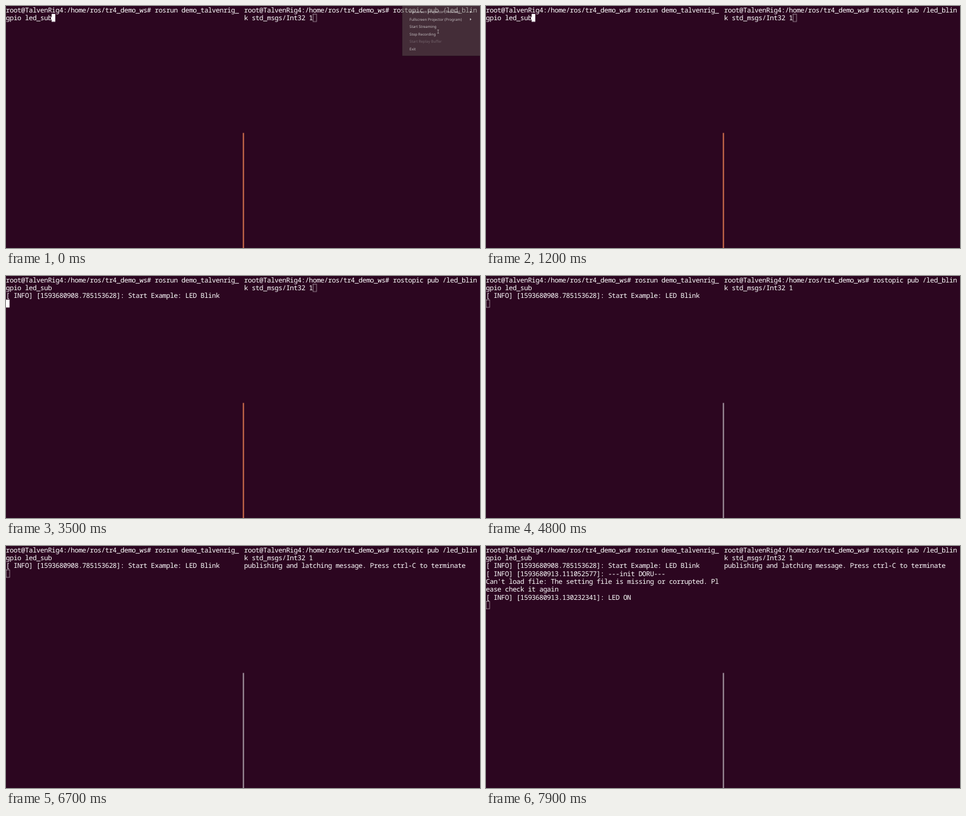
An HTML page that plays this animation: 800 px wide and 409 px high, repeating every 8000 ms.

```html
<!DOCTYPE html>
<html lang="en">
<head>
<meta charset="utf-8">
<title>Two terminals</title>
<style>
  html, body { margin: 0; width: 100%; height: 100%; overflow: hidden; background: #2c0620; }
  svg { display: block; width: 800px; height: 409px; }
  text { white-space: pre; text-rendering: geometricPrecision; }
  .term { font: 11.5px "Noto Sans Mono", monospace; letter-spacing: -.46px; fill: #fff; }
  .menu { font: 6.2px "Noto Sans", sans-serif; fill: #fff; fill-opacity: .68; }
  .menu .off { fill-opacity: .25; }

  /* 8 s loop: 1% = 80 ms */
  .t { animation: 8s step-end infinite; }
  .prompt { animation-name: prompt; }
  .enter { animation-name: enter; }
  .wait { animation-name: wait; }
  .started { animation-name: started; }
  .blur { animation-name: blur; }
  .unfocused { animation-name: unfocused; }
  .typing { animation-name: typing; }
  .sent { animation-name: sent; }
  .latched { animation-name: latched; }
  .published { animation-name: published; }
  .received { animation-name: received; }
  .split { animation-name: split; }
  .menu { animation: fade 8s linear infinite; }

  @keyframes prompt { 0%, 15% { opacity: 1 } 7.5%, 26.25%, to { opacity: 0 } }
  @keyframes enter { 0%, 31.25%, to { opacity: 0 } 28.75% { opacity: 1 } }
  @keyframes wait { 0%, 36.25%, 51.25%, to { opacity: 0 } 31.25%, 43.75% { opacity: 1 } }
  @keyframes started { 0% { opacity: 0 } 31.25%, to { opacity: 1 } }
  @keyframes blur { 0%, 85%, to { opacity: 0 } 52.5% { opacity: 1 } }
  @keyframes unfocused { 0% { opacity: 1 } 52.5%, to { opacity: 0 } }
  @keyframes typing { 0%, 60%, 75%, to { opacity: 0 } 52.5%, 67.5% { opacity: 1 } }
  @keyframes sent { 0%, 82.5%, to { opacity: 0 } 76.25% { opacity: 1 } }
  @keyframes latched { 0%, 83.75%, 98.75%, to { opacity: 0 } 82.5%, 91.25% { opacity: 1 } }
  @keyframes published { 0% { opacity: 0 } 82.5%, to { opacity: 1 } }
  @keyframes received { 0% { opacity: 0 } 85%, to { opacity: 1 } }
  @keyframes split { 0% { fill: #c8694a } 52.5%, to { fill: #9c8d98 } }
  @keyframes fade { 0%, 1.25% { opacity: 1 } 7.5%, to { opacity: 0 } }
</style>
</head>
<body>
<svg viewBox="0 0 800 409">
  <defs>
    <rect id="block" width="6.2" height="13.3" fill="#fff"/>
    <rect id="box" x=".4" y=".5" width="5.9" height="12.5" fill="none" stroke="#b5a8b0" stroke-width=".8"/>
    <path id="arrow" d="M0-2 2.6 0 0 2Z" fill="#fff" fill-opacity=".7"/>
  </defs>
  <rect width="800" height="409" fill="#2c0620"/>
  <rect class="t split" x="399.6" y="214.5" width="2.2" height="194.5"/>

  <g class="term" transform="translate(-.2)">
    <text y="10.7">root@TalvenRig4:/home/ros/tr4_demo_ws# rosrun demo_talvenrig_</text>
    <text y="24">gpio led_sub</text>
    <text class="t started" y="37.3">[ INFO] [1593680908.785153628]: Start Example: LED Blink</text>
    <g class="t received">
      <text y="50.6">[ INFO] [1593680913.111052577]: ---init DORU---</text>
      <text y="63.9">Can't load file: The setting file is missing or corrupted. Pl</text>
      <text y="77.2">ease check it again</text>
      <text y="90.5">[ INFO] [1593680913.130232341]: LED ON</text>
      <use href="#box" y="93.1"/>
    </g>
    <use class="t prompt" href="#block" x="77.2" y="13.3"/>
    <use class="t enter" href="#block" y="26.6"/>
    <use class="t wait" href="#block" y="39.9"/>
    <use class="t blur" href="#box" y="39.9"/>
  </g>

  <g class="term" transform="translate(401.8)">
    <text y="10.7">root@TalvenRig4:/home/ros/tr4_demo_ws# rostopic pub /led_blin</text>
    <text y="24">k std_msgs/Int32 1</text>
    <text class="t published" y="37.3">publishing and latching message. Press ctrl-C to terminate</text>
    <use class="t unfocused" href="#box" x="115.9" y="13.3"/>
    <use class="t typing" href="#block" x="115.9" y="13.3"/>
    <use class="t sent" href="#block" y="26.6"/>
    <use class="t latched" href="#block" y="39.9"/>
  </g>

  <g class="menu">
    <rect x="668.5" y="-2" width="133" height="86.5" fill="#5a5350" fill-opacity=".52" stroke="#1c0614" stroke-opacity=".5"/>
    <text x="681" y="12.4">Fullscreen Projector (Preview)</text>
    <text x="681" y="24.8">Fullscreen Projector (Program)</text>
    <text x="681" y="37.3">Start Streaming</text>
    <text x="681" y="49.8">Stop Recording</text>
    <text class="off" x="681" y="62.2">Start Replay Buffer</text>
    <text x="681" y="74.6">Exit</text>
    <use href="#arrow" x="783" y="10"/>
    <use href="#arrow" x="783" y="22.4"/>
    <path d="M727.8 40.5h3M729.3 40.5v5.5M727.8 46h3" fill="none" stroke="#fff" stroke-opacity=".6" stroke-width=".7"/>
  </g>
</svg>
</body>
</html>
```
